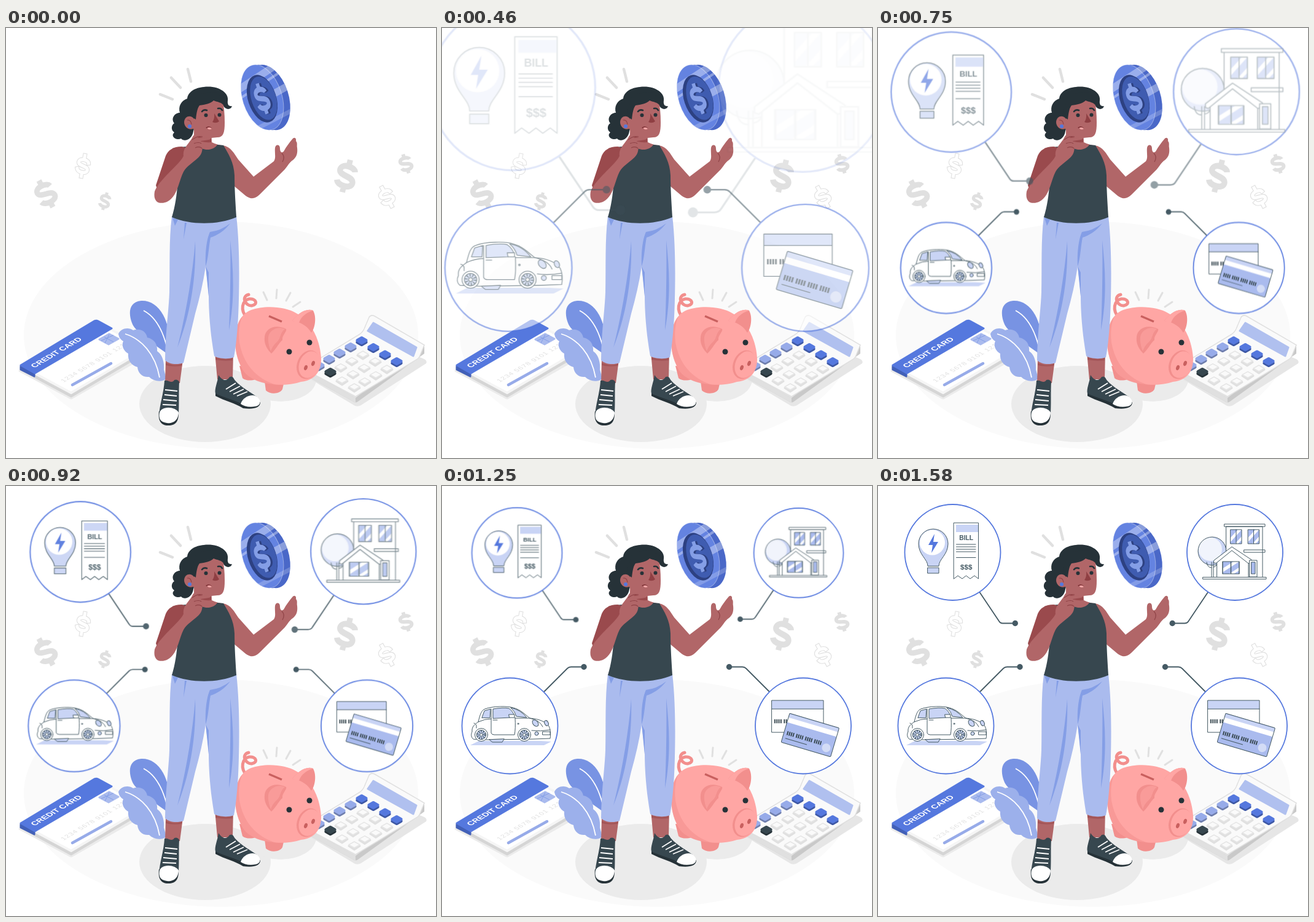
An HTML page without scripts for the animation above (1.62 s loop, 700 by 700 pixels).

```html
<!DOCTYPE html>
<html lang="en">
<head>
<meta charset="utf-8">
<title>Personal budget</title>
<style>
  html, body { margin: 0; height: 100%; overflow: hidden; background: #fff; }
  svg { display: block; width: 100vw; height: 100vh; }
  text { font-family: "Liberation Sans", Arial, sans-serif; font-weight: 700; }

  .ink { fill: none; stroke: #455a64; stroke-width: 1; stroke-linejoin: round; stroke-linecap: round; }
  .white { fill: #fff; }
  .pale { fill: #c9d4f5; }
  .sky { fill: #aabbee; }
  .blue { fill: #5578de; }
  .dark { fill: #37474f; }
  .hair { fill: #263238; }
  .skin { fill: #b16668; }
  .shade { fill: #9a4a4d; }
  .fold { fill: #849ee6; }
  .pink { fill: #ffa6a4; }
  .rose { fill: #f28f8d; }
  .floor { fill: #ebebeb; }
  .spark { fill: none; stroke: #e0e0e0; stroke-linecap: round; }
  .ring { fill: #fff; stroke: #5578de; stroke-width: 1.8; }
  .link { fill: none; stroke: #455a64; stroke-width: 1.8; }
  .dot { fill: #455a64; }

  .bubble { --zoom: 2; --veil: opacity(.5); }
  .house { --zoom: 1.5; --veil: opacity(1); }
  .bubble, .house { animation: 1620ms cubic-bezier(.36, -.01, .5, 1.38) infinite; }
  .car   { animation-name: pop-first;  transform-origin: 118px 391px; }
  .cards { animation-name: pop-first;  transform-origin: 577.3px 391px; }
  .bills { animation-name: pop-second; transform-origin: 130.6px 123px; }
  .home  { animation-name: pop-third;  transform-origin: 573px 122px; }
  .house { animation-name: pop-third;  transform-origin: 575.4px 109px; }
  @keyframes pop-first {
    0% { opacity: 0; filter: var(--veil); transform: scale(var(--zoom)); }
    61.2%, 100% { opacity: 1; filter: opacity(1); transform: scale(1); }
  }
  @keyframes pop-second {
    0%, 6.5% { opacity: 0; filter: var(--veil); transform: scale(var(--zoom)); }
    86.1%, 100% { opacity: 1; filter: opacity(1); transform: scale(1); }
  }
  @keyframes pop-third {
    0%, 6.3% { opacity: 0; filter: var(--veil); transform: scale(var(--zoom)); }
    91.4%, 100% { opacity: 1; filter: opacity(1); transform: scale(1); }
  }
</style>
</head>
<body>
<svg viewBox="0 0 700 700">
  <defs>
    <path id="dollar" fill="none" d="M13-9C11-17-12-19-13-8C-13 3 13-3 13 9C12 19-11 18-14 9M0-16V-26M0 16V26"/>
    <g id="hollow">
      <use href="#dollar" stroke="#e0e0e0" stroke-width="11.5" stroke-linecap="square"/>
      <use href="#dollar" stroke="#fff" stroke-width="8" stroke-linecap="square"/>
    </g>
    <g id="key" stroke-width="5" stroke-linejoin="round">
      <path d="M-7 0L0-4L7 0L0 4Z" transform="translate(0 3)" fill="currentColor" stroke="currentColor"/>
      <path d="M-7 0L0-4L7 0L0 4Z" transform="translate(0 3)" fill="#000" stroke="#000" opacity=".25"/>
      <path d="M-7 0L0-4L7 0L0 4Z" fill="currentColor" stroke="currentColor"/>
    </g>
    <g id="cap" stroke-linejoin="round">
      <path d="M-9 2L0-3L9 2L0 8Z" fill="#e0e0e0" stroke="#e0e0e0" stroke-width="3"/>
      <path d="M-9 0L0-5L9 0L0 5Z" fill="#fafafa" stroke="#e6e6e6" stroke-width="1.5"/>
    </g>
    <g id="cap-row">
      <use href="#cap"/>
      <use href="#cap" x="-18" y="10.3"/>
      <use href="#cap" x="-36" y="20.6"/>
    </g>
    <g id="wheel" class="ink">
      <circle r="10.5" class="white"/>
      <circle r="7.6" class="pale"/>
      <circle r="5.2" stroke-width="4" stroke-dasharray="1.3 2" stroke-linecap="butt"/>
      <circle r="2.3" class="white"/>
    </g>
    <g id="pane">
      <path class="sky" d="M0 0H18V23H0Z"/>
      <path class="white" d="M0 13L12 0H18L0 20ZM7 23L18 11V17L12 23Z"/>
      <path class="ink" d="M0 0H18V23H0ZM9 0V23"/>
    </g>
    <path id="digits" fill="none" stroke="#37474f" stroke-width="6.5" stroke-dasharray="1.9 1.4 1.9 1.4 1.9 1.4 1.9 3.6" d="M0 0H58"/>
    <clipPath id="coin-clip">
      <ellipse rx="32" ry="55" transform="translate(417 113) rotate(-18)"/>
      <ellipse rx="32" ry="55" transform="translate(428 113) rotate(-18)"/>
    </clipPath>
  </defs>

  <!-- ground and signs -->
  <ellipse cx="350" cy="500" rx="321" ry="185" fill="#fafafa"/>
  <ellipse cx="324" cy="612" rx="107" ry="62" class="floor"/>
  <ellipse cx="447" cy="572" rx="58" ry="36" class="floor"/>
  <g stroke="#e0e0e0" stroke-width="9.5">
    <use href="#dollar" transform="translate(65 270) rotate(-28) scale(.92 .94)"/>
    <use href="#dollar" transform="translate(161 282) rotate(14) scale(.53 .56)"/>
    <use href="#dollar" transform="translate(554 241) rotate(14) scale(.96 1.04)"/>
    <use href="#dollar" transform="translate(651 221) rotate(-17) scale(.62)"/>
  </g>
  <use href="#hollow" transform="translate(125.500 224.500) rotate(10) scale(.62 .66)"/>
  <use href="#hollow" transform="translate(620 275) rotate(-28) scale(.66 .64)"/>

  <!-- bank card -->
  <g stroke-linejoin="round">
    <path d="M22 556L106 601L232 529" fill="none" stroke="#ebebeb" stroke-width="7"/>
    <path d="M24 550L106 594L228 522V528L106 600L24 556Z" fill="#d5d5d5" stroke="#d5d5d5" stroke-width="3"/>
    <path d="M24 550L146 477L228 522L106 594Z" fill="#fff" stroke="#f5f5f5" stroke-width="4"/>
    <path d="M24 551V556L46 567V563Z" fill="#4260b8" stroke="#4260b8" stroke-width="3"/>
    <path d="M24 549L142 478Q146 475 150 477L172 489L47 562Z" class="blue" stroke="#5578de" stroke-width="3"/>
  </g>
  <text transform="matrix(.86 -.51 .82 .47 46.500 553.500)" font-size="13.200" fill="#fff">CREDIT CARD</text>
  <text transform="matrix(.86 -.51 .8 .46 94 577)" font-size="11" fill="#e0e0e0" style="font-weight:400" letter-spacing="1">1234 5678 9101 1213</text>
  <path d="M152 507L168 498L183 506L167 515Z" fill="#aabbee" stroke="#aabbee" stroke-width="3" stroke-linejoin="round"/>
  <path d="M155 509L175 500M160 503L175 511M168 499L161 513" stroke="#849ee6" fill="none"/>
  <path d="M108 581L171 546" stroke="#97abe9" stroke-width="4.500" stroke-linecap="round"/>

  <!-- calculator -->
  <path d="M486 566L568 615Q573 617 578 614L684 546Q686 542 681 539L590 500Z" fill="#e6e6e6"/>
  <path d="M496 561L569 602L681 517V530L573 608Q569 611 565 608L496 570Z" fill="#c9c9c9"/>
  <path d="M496 561L569 602V610L565 608L496 570Z" fill="#e0e0e0"/>
  <path d="M496 561L569 600L668 540Q672 538 674 533L681 516L600 469Q594 466 591 471L583 490Q580 496 575 499L494 548Z" fill="#fafafa" stroke="#e0e0e0" stroke-width="1.500"/>
  <path d="M598 480L668 520L663 534L589 493Z" fill="#b0c0ef" stroke="#b0c0ef" stroke-width="3" stroke-linejoin="round"/>
  <g color="#5578de">
    <use href="#key" x="579" y="508.500"/>
    <use href="#key" x="598" y="519.500"/>
    <use href="#key" x="617" y="531"/>
    <use href="#key" x="636" y="542.500"/>
  </g>
  <g color="#97abe9">
    <use href="#key" x="561" y="518.500"/>
    <use href="#key" x="543" y="528.500"/>
    <use href="#key" x="526" y="538.500"/>
    <use href="#key" x="509" y="549"/>
  </g>
  <use href="#key" x="528" y="559.500" color="#37474f"/>
  <use href="#cap-row" x="581" y="531"/>
  <use href="#cap-row" x="601" y="542"/>
  <use href="#cap-row" x="620" y="554"/>
  <use href="#cap" x="547" y="573"/>
  <use href="#cap" x="567" y="584"/>

  <!-- piggy bank -->
  <path class="spark" stroke-width="3" d="M419 430L425 443M441 426L440 440M463 431L456 444M479 446L467 454"/>
  <path d="M392 471C381 460 384 443 396 441C407 440 411 450 400 452C390 453 382 437 395 434" fill="none" stroke="#f28f8d" stroke-width="5" stroke-linecap="round"/>
  <path class="rose" d="M380 550L385 570C392 576 408 574 412 568L420 568L423 590C430 597 446 596 450 588L453 575L482 571Q492 573 494 563Z"/>
  <path class="pink" d="M399 459C420 451 455 453 472 464C496 476 511 506 513 537C514 560 501 574 480 576C455 585 405 582 388 560C370 535 367 490 385 469Q391 462 399 459Z"/>
  <path class="rose" d="M385 469C367 490 370 535 388 560C398 573 420 580 440 581C405 570 386 545 380 512C378 495 380 480 385 469Z" opacity=".55"/>
  <path class="rose" d="M466 477C473 466 489 455 500 460C506 471 503 489 497 496C490 484 478 478 466 477Z"/>
  <path class="pink" d="M466 477C473 466 489 455 500 460C489 463 480 470 477 480Z"/>
  <path class="rose" d="M421 503C422 489 438 481 456 490C458 494 449 500 450 508C444 513 441 521 432 530C423 521 420 512 421 503Z"/>
  <path class="pink" d="M427 503C429 492 441 485 454 490C445 497 448 505 441 511Q434 517 431 526Q426 514 427 503Z" opacity=".55"/>
  <path d="M428 469L449 478" stroke="#c9605f" stroke-width="3.500"/>
  <circle cx="461" cy="527" r="4.500" class="hair"/>
  <circle cx="494" cy="512" r="4.500" class="hair"/>
  <ellipse rx="18" ry="24" transform="translate(492 548) rotate(22)" class="rose"/>
  <ellipse rx="16.500" ry="22.500" transform="translate(494 548) rotate(22)" fill="#ffa6a4"/>
  <g fill="#c9605f">
    <ellipse rx="2.700" ry="4.300" transform="translate(488 553) rotate(20)"/>
    <ellipse rx="2.700" ry="4.300" transform="translate(500 546) rotate(20)"/>
  </g>

  <!-- plant -->
  <path d="M262 482C254 456 238 443 220 444C200 446 199 464 205 480C212 498 226 494 231 508L262 530Z" fill="#7893e3"/>
  <path d="M224 460C243 470 254 490 261 516" fill="none" stroke="#fff" stroke-width="1.800"/>
  <path d="M183 498C187 488 200 487 207 492C218 488 228 493 230 504C241 506 247 515 246 526C255 532 258 545 257 556L261 571C252 578 239 574 233 568C222 569 215 562 214 552C203 549 198 540 199 530C190 525 188 515 191 510Q184 506 183 498Z" fill="#9cb0eb"/>
  <path d="M194 498C220 506 243 530 250 569" fill="none" stroke="#fff" stroke-width="1.800"/>

  <!-- legs and shoes -->
  <path class="skin" d="M260 538L288 540L283 578H259ZM340 528H370L369 572H344Z"/>
  <path class="shade" d="M260 545Q276 552 287 546L286 550Q270 552 260 549ZM341 536Q356 541 369 537V541Q355 543 341 540Z" opacity=".6"/>
  <path class="hair" d="M249 624C247 642 254 647 264 647C277 647 281 640 281 626Z"/>
  <path class="dark" d="M258 574C264 572 270 580 274 573Q279 571 282 576C281 592 282 608 281 628L249 632C250 612 257 594 258 574Z"/>
  <path class="white" d="M250 626C253 615 276 616 281 626C280 641 270 644 262 643C252 642 248 636 250 626Z"/>
  <path d="M259 589L279 591M258 597L278 599M256 605L278 607M255 613L277 614" stroke="#fff" stroke-width="1.800"/>
  <path class="hair" d="M341 591V599C356 607 374 611 386 619C402 621 414 619 414 609Z"/>
  <path class="dark" d="M346 565C352 574 359 576 364 568Q369 566 371 571C376 580 396 592 408 600L390 615C374 606 355 602 341 595C339 588 344 578 346 565Z"/>
  <path class="white" d="M382 612C386 600 400 595 408 600C417 607 414 615 406 616C396 618 388 616 382 612Z"/>
  <path d="M358 588L374 578M364 592L381 583M370 596L387 588M376 599L393 592" stroke="#fff" stroke-width="1.800"/>
  <path class="sky" d="M270 306C300 320 350 320 375 306C380 350 380 400 379 440C378 490 374 520 371 536C360 540 346 538 339 534C333 500 330 465 330 435Q328 410 325 388C321 415 315 440 308 465L289 545C278 549 265 547 259 541C259 500 265 460 266 430C267 390 265 345 270 306Z"/>
  <path class="fold" d="M271 309L280 312L275 322ZM294 317L289 344L291 317ZM365 318C355 331 343 338 333 341C330 355 330 372 325 388C324 368 326 345 332 332Q350 330 365 318ZM325 388L330 398V437ZM365 345C370 390 373 440 363 492C365 440 366 390 365 345ZM308 347C310 410 299 470 279 520C293 465 304 400 308 347Z"/>

  <!-- body -->
  <path class="spark" stroke-width="4.500" d="M251 108L271 116M269 81L284 97M296 67L301 87"/>
  <path class="skin" d="M306 160H334L335 186Q345 191 354 191L350 212H290V196Q306 193 306 182Z"/>
  <path class="shade" d="M308 173Q322 182 334 180V186Q318 187 308 181Z"/>
  <path class="skin" d="M353 191C366 193 372 205 378 214L403 242L436 217C440 211 437 204 438 195C439 189 446 189 446 196C446 202 449 204 452 201C456 193 462 186 466 181C469 177 473 179 472 184C475 187 473 191 474 195C475 204 473 210 467 215C461 219 459 224 454 230L414 270C405 279 398 279 390 273L371 257Z"/>
  <path d="M449 204Q455 209 450 218" fill="none" stroke="#8f4347" stroke-width="1.200"/>
  <path class="dark" d="M284 194L312 191C320 201 338 200 344 190L354 191C362 205 371 218 372 240C372 265 374 290 375 308C345 321 300 321 270 308C277 285 279 262 280 242C286 225 284 205 284 194Z"/>
  <path class="shade" d="M286 193C272 193 264 199 260 208L244 256L248 268L289 225L293 195Z"/>

  <!-- head -->
  <path class="hair" d="M322 96C345 93 363 105 361 118C360 125 363 128 368 127C366 134 357 133 354 127L310 150L305 168C303 182 290 186 285 180C277 184 267 176 274 170C268 166 269 158 274 155C268 148 274 138 283 138C280 128 285 118 295 115C296 104 308 97 322 96Z"/>
  <path class="skin" d="M312 116L352 114C355 128 356 140 356 154C356 170 354 178 344 178L334 179C320 178 308 172 305 164C297 167 290 161 290 153C291 143 301 141 306 148Q311 142 312 116Z"/>
  <path class="hair" d="M309 149C310 137 312 130 315 126C324 125 333 123 338 118C344 121 351 120 356 128L360 117L340 104L310 108L300 142Z"/>
  <path d="M319 136Q322 132 327 134M345 131Q350 130 352 134" fill="none" stroke="#263238" stroke-width="2.600" stroke-linecap="round"/>
  <circle cx="325.500" cy="142" r="3" class="hair"/>
  <circle cx="347.500" cy="141.500" r="3" class="hair"/>
  <path d="M339 139L347 152Q342 156 336 153Q340 148 339 139Z" fill="#8f3f43"/>
  <path d="M325 162Q331 158 335 163Q331 167 325 162Z" fill="#7c2f33"/>
  <path d="M327 163Q332 160 335 164Q331 167 327 163Z" fill="#f0a5a5"/>
  <path d="M295 150Q301 149 302 157" fill="none" stroke="#8f4347" stroke-width="1.200"/>
  <circle cx="299" cy="160" r="3" class="blue"/>

  <!-- thinking arm -->
  <path class="skin" d="M242 266C248 248 286 219 289 208C287 196 298 188 303 179C306 171 316 168 322 171C321 176 314 176 312 179L331 178Q335 181 330 182L317 184C321 192 321 204 313 211C301 222 295 224 289 234C281 250 279 275 262 283C249 288 239 283 242 266Z"/>
  <path d="M303 182Q311 175 320 177M306 188Q314 185 318 188M308 195Q315 192 319 196" fill="none" stroke="#8f4347" stroke-width="1.200"/>

  <!-- coin -->
  <ellipse rx="32" ry="55" transform="translate(428 113) rotate(-18)" fill="#4a68c8"/>
  <ellipse rx="32" ry="55" transform="translate(422 113) rotate(-18)" fill="#4a68c8"/>
  <ellipse rx="32" ry="55" transform="translate(417 113) rotate(-18)" fill="#6483e1"/>
  <g clip-path="url(#coin-clip)" fill="none" stroke="#fff">
    <path d="M440 60L376 102" stroke-width="12" opacity=".35"/>
    <path d="M446 72L376 118" stroke-width="4" opacity=".35"/>
    <path d="M470 88L436 107" stroke-width="12" opacity=".35"/>
    <path d="M466 134L404 166" stroke-width="7" opacity=".2"/>
    <ellipse rx="32" ry="55" transform="translate(417 113) rotate(-18)" opacity=".4"/>
  </g>
  <g transform="translate(417 115) rotate(-18)">
    <ellipse rx="23" ry="40" fill="#2d4182"/>
    <ellipse cx="2.500" rx="20" ry="36.500" fill="#3f5cb0"/>
    <g stroke-width="9" transform="scale(.62 1)">
      <use href="#dollar" x="5" y="1" stroke="#2d4182"/>
      <use href="#dollar" stroke="#849ee6"/>
    </g>
  </g>

  <!-- bubbles -->
  <g class="bubble car">
    <path class="link" d="M166 335L204 297Q206.500 294.500 210 294.500H231"/>
    <circle class="dot" cx="231" cy="294.500" r="4.700"/>
    <circle class="ring" cx="110.500" cy="390.500" r="78"/>
    <path class="pale" d="M46 422L60 415H160L178 416L166 422Z"/>
    <g class="ink">
      <path class="white" d="M51 412C47 409 47 404 49 400C48 391 54 388 59 384C62 372 64 365 70 363C82 358 108 358 116 361C128 364 135 372 143 378C158 379 169 384 174 391C177 397 177 405 176 411L148 412L75 413Z"/>
      <path class="pale" d="M65 377L69 366L79 363L78 377ZM83 378V363Q100 360 109 362Q116 367 118 375L110 377ZM112 361Q128 364 138 377L121 375Q119 367 112 361Z"/>
      <path class="white" d="M109 372H118V377H110Z"/>
      <path d="M80 363V402Q81 405 85 405H118Q120 396 119 377M83 381H90M59 384Q70 379 80 379M119 378L143 378Q160 382 164 392M146 398Q160 400 176 397M52 386Q57 387 56 394"/>
      <circle cx="124" cy="387" r="1"/>
      <ellipse class="pale" rx="4" ry="6" transform="translate(152 386) rotate(-40)"/>
      <ellipse class="pale" rx="3" ry="4.500" transform="translate(170 386) rotate(-25)"/>
      <circle class="pale" cx="154" cy="403" r="3"/>
      <path class="white" d="M164 400H176V405H164Z"/>
      <path class="pale" d="M77 413L82 417H98L101 412Z"/>
    </g>
    <use href="#wheel" x="64" y="405"/>
    <use href="#wheel" x="134" y="405"/>
  </g>

  <g class="bubble cards">
    <path class="link" d="M533 335L495 297Q492.500 294.500 489 294.500H467.500"/>
    <circle class="dot" cx="467.500" cy="294.500" r="4.700"/>
    <circle class="ring" cx="588" cy="390.500" r="78"/>
    <path class="white" d="M537 349H621V401H537Z"/>
    <path class="pale" d="M537 349H621V363H537Z"/>
    <path class="ink" d="M537 349H621V401H537ZM537 363H621"/>
    <use href="#digits" x="541" y="383"/>
    <g transform="translate(566 370) rotate(16.500)">
      <rect class="sky" width="84" height="49" rx="1.500"/>
      <path class="pale" d="M0 1H84V8H0Z"/>
      <path class="white" d="M0 7H84V15H0Z"/>
      <rect class="ink" width="84" height="49" rx="1.500"/>
      <use href="#digits" x="5" y="32"/>
      <path class="ink" d="M5 41H41"/>
      <circle cx="73" cy="37" r="7" fill="#d3dcf6"/>
    </g>
  </g>

  <g class="bubble bills">
    <path class="link" d="M165.500 173L197 220Q199 223.500 203 223.500H223"/>
    <circle class="dot" cx="223.300" cy="223.500" r="4.700"/>
    <circle class="ring" cx="121.500" cy="108" r="78"/>
    <path class="pale" d="M81 130C81 119 66 112 66 94A24 24 0 0 1 114 94C114 112 99 119 99 130Z"/>
    <circle class="white" cx="88.500" cy="92" r="20.500"/>
    <path class="pale" d="M81 133H99V142H81Z"/>
    <path class="ink" d="M81 130C81 119 66 112 66 94A24 24 0 0 1 114 94C114 112 99 119 99 130ZM81 133H99V142H81Z"/>
    <path class="blue" d="M92 78L82 96H89L87 109L98 91H90Z"/>
    <path class="ink" style="fill:#fff" d="M123.500 60H163.500V151L157 146L150 151L143.500 146L137 151L130 146L123.500 151Z"/>
    <path class="pale" d="M127 63H163V75H127Z"/>
    <g class="dot" text-anchor="middle">
      <text x="143.700" y="88" font-size="10.300">BILL</text>
      <text x="143.700" y="135.500" font-size="11.500">$$$</text>
    </g>
    <path class="ink" d="M127.500 95H159M127.500 99H159M127.500 103H159M127.500 107H159M127.500 116.500H159"/>
  </g>

  <g class="bubble home">
    <path class="link" d="M537 173L505.500 220Q503.500 223.500 499 223.500H479"/>
    <circle class="dot" cx="479.200" cy="223.500" r="4.700"/>
    <circle class="ring" cx="581" cy="108" r="78"/>
    <g class="house">
      <circle class="pale" cx="544" cy="106" r="23"/>
      <circle class="white" cx="541" cy="103" r="19" opacity=".75"/>
      <g class="ink">
        <circle cx="544" cy="106" r="23"/>
        <path d="M543 124V148M546 124V148M535 124Q536 133 543 133M553 122Q553 131 546 132"/>
        <path class="white" d="M567 66H626V149H567ZM564 62H630V66H564ZM596 104H630V108H596Z"/>
        <path class="white" d="M552 124L576 104L603 124V149H552Z"/>
        <path class="white" d="M547 121L576 99L608 120V125L603 126L576 105L550 126L547 125Z"/>
        <path class="white" d="M605 121H617V148H605Z"/>
        <path class="sky" d="M608 124H614V143H608Z"/>
        <path class="white" d="M529 148.500H632V151.500H529Z"/>
      </g>
      <use href="#pane" x="574" y="71"/>
      <use href="#pane" x="602.500" y="71"/>
      <use href="#pane" transform="translate(561 123) scale(1.500 .87)"/>
    </g>
  </g>
</svg>
</body>
</html>
```
